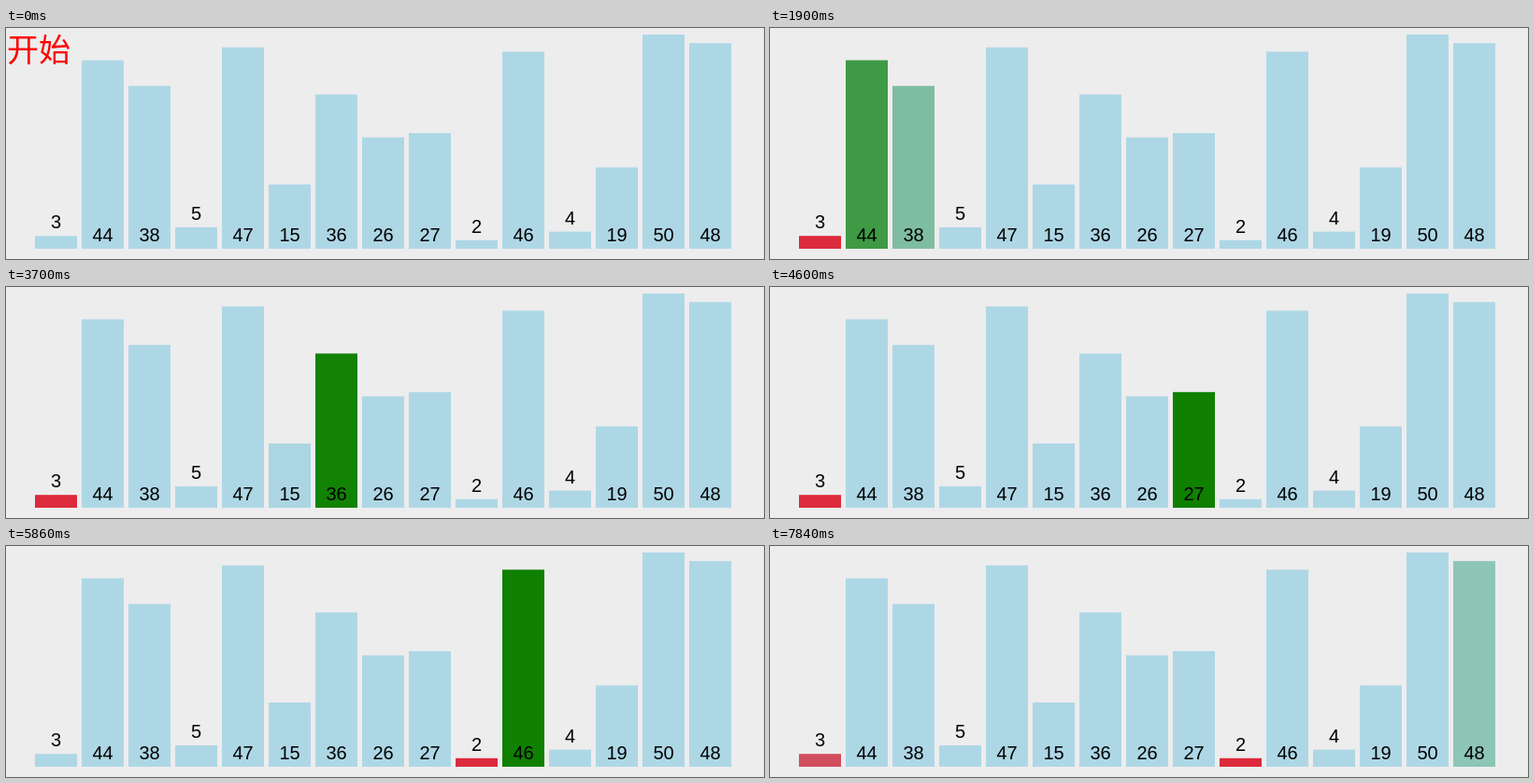
Write an HTML page that moves like this. It is 811 px wide and 248 px high and loops after 8 s.

```html
<!DOCTYPE html>
<html lang="zh">
<head>
<meta charset="utf-8">
<title>选择排序</title>
<style>
  html, body { margin: 0; width: 100%; height: 100%; overflow: hidden; background: #ededed; }
  svg { display: block; width: 811px; height: 248px; }
  .label { font: 20px "Liberation Sans", Arial, sans-serif; text-anchor: middle; }
  #start { font: 300 34px "Noto Sans CJK SC", "Noto Sans CJK", sans-serif; fill: #fe0000; }
</style>
</head>
<body>
<svg viewBox="0 0 811 248">
  <g id="chart"></g>
  <text id="start" x="1" y="36">开始</text>
</svg>
<script>
const LOOP = 8000, SORT_START = 1000, TICK = 180;
const FIRST_STEP = 938, STEP = 420, FADE = 290;
const BASE = 237, SCALE = 4.6;
const BLUE = [174, 215, 230], GREEN = [15, 128, 0], RED = [220, 43, 60];
const values = [3, 44, 38, 5, 47, 15, 36, 26, 27, 2, 46, 4, 19, 50, 48];

const chart = document.getElementById("chart");
const startText = document.getElementById("start");

function add(name, attributes) {
  const node = document.createElementNS("http://www.w3.org/2000/svg", name);
  for (const key in attributes) node.setAttribute(key, attributes[key]);
  return chart.appendChild(node);
}

const bars = values.map((value, i) => {
  const x = 31 + 50 * i, height = value * SCALE, top = BASE - height;
  const bar = add("rect", { x, y: top, width: 45, height });
  const baseline = (value < 10 ? top : BASE) - 8;
  add("text", { class: "label", x: x + 22.5, y: baseline }).textContent = value;
  return bar;
});

// Each step recolours some bars: [bar index, new colour].
const steps = [[[0, RED]]];
let minimum = 0;
for (let i = 1; i < values.length; i++) {
  const previous = i - 1;
  const step = [[i, GREEN]];
  if (previous !== minimum) step.push([previous, BLUE]);
  steps.push(step);
  if (values[i] < values[minimum]) {
    steps.push([[minimum, BLUE], [i, RED]]);
    minimum = i;
  }
}
steps.push([[values.length - 1, BLUE], [0, RED]]);

const cubicInOut = t => t < 0.5 ? 4 * t ** 3 : 1 - 4 * (1 - t) ** 3;
const mix = (a, b, p) => a.map((channel, i) => channel + (b[i] - channel) * p);

function draw(time) {
  const started = time >= SORT_START;
  startText.style.display = started ? "none" : "";
  const colors = values.map(() => BLUE);
  if (started) {
    const now = time - (time - SORT_START) % TICK;
    steps.forEach((step, k) => {
      const t = (now - FIRST_STEP - k * STEP) / FADE;
      const p = cubicInOut(Math.max(0, Math.min(1, t)));
      for (const [i, color] of step) colors[i] = mix(colors[i], color, p);
    });
  }
  bars.forEach((bar, i) => bar.setAttribute("fill", `rgb(${colors[i].map(Math.round)})`));
}

function frame() {
  draw(performance.now() % LOOP);
  requestAnimationFrame(frame);
}
frame();
</script>
</body>
</html>
```
